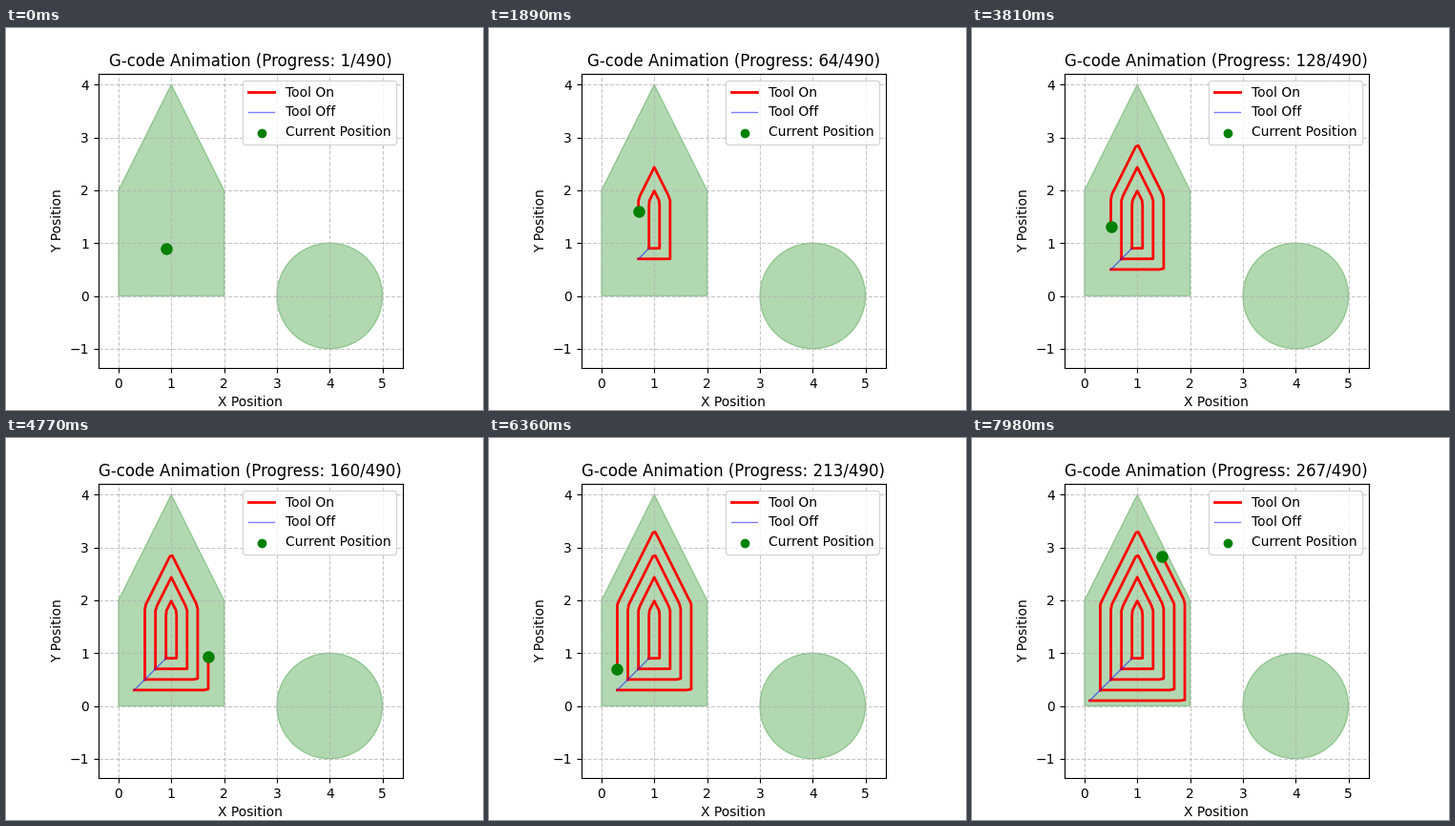
A matplotlib script for the animation above (8000 ms loop, 500 px wide and 400 px high).

```python
import numpy as np
import matplotlib.pyplot as plt
from matplotlib.animation import FuncAnimation

TOTAL = 490          # tool positions in the whole program
STEP = 0.1           # spacing of points along a contour
STEP_MS = 30         # time per tool position
LOOP_MS = 8000
INTERVAL = 20

HOUSE = [(0, 0), (2, 0), (2, 2), (1, 4), (0, 2)]


def inset_house(d):
    """Closed outline of the house moved inwards by d."""
    s = np.sqrt(5)
    eave = 2 + (2 - s) * d
    return np.array([(d, d), (2 - d, d), (2 - d, eave),
                     (1, 4 - s * d), (d, eave), (d, d)])


def resample(poly):
    """Evenly spaced points along a closed outline."""
    dist = np.r_[0, np.cumsum(np.hypot(*np.diff(poly, axis=0).T))]
    count = int(dist[-1] / STEP - 1e-9) + 1
    at = np.linspace(0, dist[-1], count)
    return np.c_[np.interp(at, dist, poly[:, 0]),
                 np.interp(at, dist, poly[:, 1])]


# Each ring: move to start, switch on, cut, switch off
points, cutting = [], []
for d in (0.9, 0.7, 0.5, 0.3, 0.1):
    ring = resample(inset_house(d))
    points += [ring[0], ring[0], *ring, ring[-1]]
    cutting += [False, False, *[True] * len(ring), False]
points = np.array(points)
cutting = np.array(cutting)[:, None]
on_path = np.where(cutting, points, np.nan)
off_path = np.where(cutting, np.nan, points)

fig, ax = plt.subplots(figsize=(5, 4), dpi=100)

angle = np.linspace(0, 2 * np.pi, 65)
ax.fill(*zip(*HOUSE), color="green", alpha=0.3)
ax.fill(4 + np.cos(angle), np.sin(angle), color="green", alpha=0.3)

on_line, = ax.plot([], [], color="red", lw=2, label="Tool On")
off_line, = ax.plot([], [], color="blue", lw=1, alpha=0.5, label="Tool Off")
ax.scatter([], [], color="green", label="Current Position")
tool, = ax.plot([], [], "o", color="green", markersize=8)

# Limits: extent of all tool positions plus 10 percent
low = np.array([0.1, -0.9])
high = np.array([4.9, points[:, 1].max()])
pad = 0.1 * (high - low)
ax.set_xlim(low[0] - pad[0], high[0] + pad[0])
ax.set_ylim(low[1] - pad[1], high[1] + pad[1])
ax.set_aspect("equal")
ax.grid(True, linestyle="--", alpha=0.7)
ax.set_xlabel("X Position")
ax.set_ylabel("Y Position")
ax.legend(loc="upper right")
title = ax.set_title("")


def update(frame):
    i = int((frame + 0.5) * INTERVAL // STEP_MS)
    on_line.set_data(*on_path[:i + 1].T)
    off_line.set_data(*off_path[:i + 1].T)
    tool.set_data(*points[i:i + 1].T)
    title.set_text(f"G-code Animation (Progress: {i + 1}/{TOTAL})")
    return on_line, off_line, tool, title


anim = FuncAnimation(fig, update, frames=LOOP_MS // INTERVAL,
                     interval=INTERVAL, repeat=True, repeat_delay=0)
plt.show()
```
